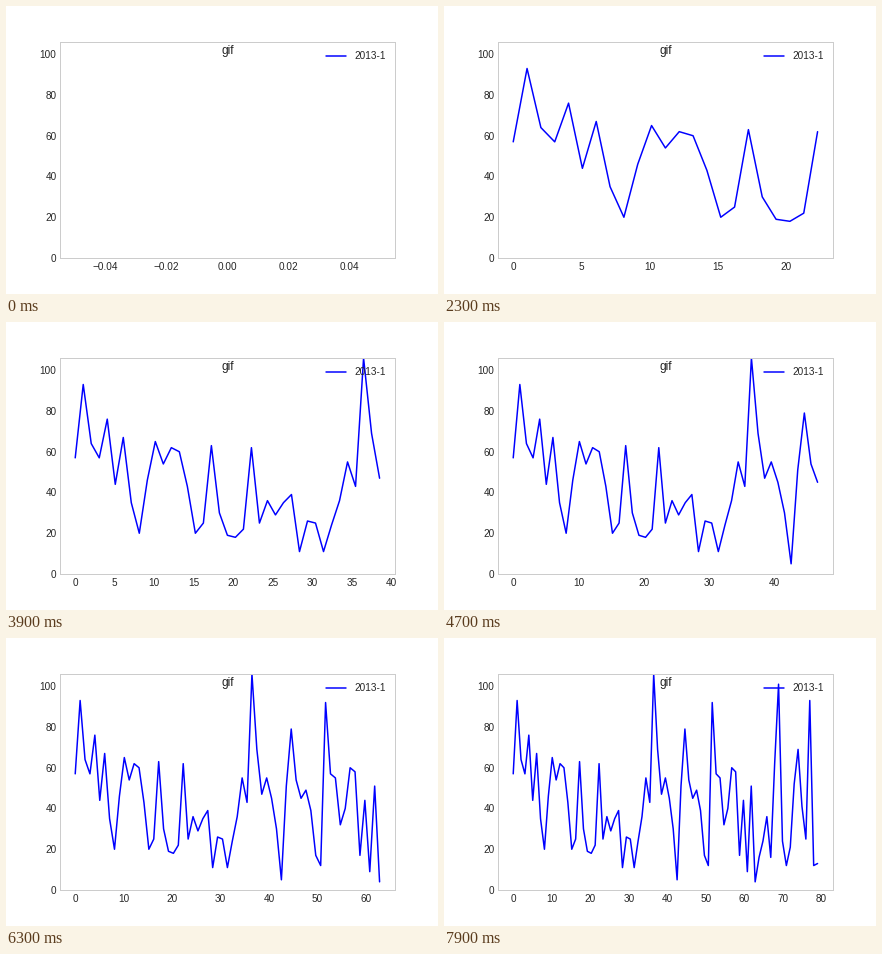
Write a matplotlib script that moves like this. It is 432x288 px and loops after 8 s.

```python
import matplotlib.pyplot as plt
import numpy as np
from matplotlib.animation import FuncAnimation

plt.rcParams.update({
    "font.family": "Liberation Sans",
    "font.size": 10,
    "text.color": ".15",
    "xtick.color": ".15",
    "ytick.color": ".15",
    "xtick.major.size": 0,
    "ytick.major.size": 0,
    "axes.edgecolor": ".8",
    "axes.linewidth": 1,
    "lines.solid_capstyle": "round",
})

FRAMES = 80
values = [
    57, 93, 64, 57, 76, 44, 67, 35, 20, 46, 65, 54, 62, 60, 43, 20,
    25, 63, 30, 19, 18, 22, 62, 25, 36, 29, 35, 39, 11, 26, 25, 11,
    24, 36, 55, 43, 106, 69, 47, 55, 45, 30, 5, 51, 79, 54, 45, 49,
    39, 17, 12, 92, 57, 55, 32, 40, 60, 58, 17, 44, 9, 51, 4, 16,
    24, 36, 16, 62, 101, 24, 12, 21, 52, 69, 41, 25, 93, 12, 13,
]
xs = np.linspace(0, FRAMES, FRAMES)

fig, ax = plt.subplots(figsize=(6, 4), dpi=72)
fig.subplots_adjust(left=0.125, right=0.9, bottom=0.125, top=0.875)
line, = ax.plot([], [], color="blue", lw=1.5, label="2013-1")
ax.set_ylim(0, max(values))
ax.set_title("gif", fontsize=12, y=0.92, pad=5)
ax.legend(loc="upper right", frameon=False)


def update(i):
    line.set_data(xs[:i], values[:i])
    if i < 2:
        ax.set_xlim(-0.055, 0.055)
    else:
        pad = 0.05 * xs[i - 1]
        ax.set_xlim(-pad, xs[i - 1] + pad)
    return line,


anim = FuncAnimation(fig, update, frames=FRAMES, interval=100,
                     repeat=True, repeat_delay=0, blit=False)
plt.show()
```
